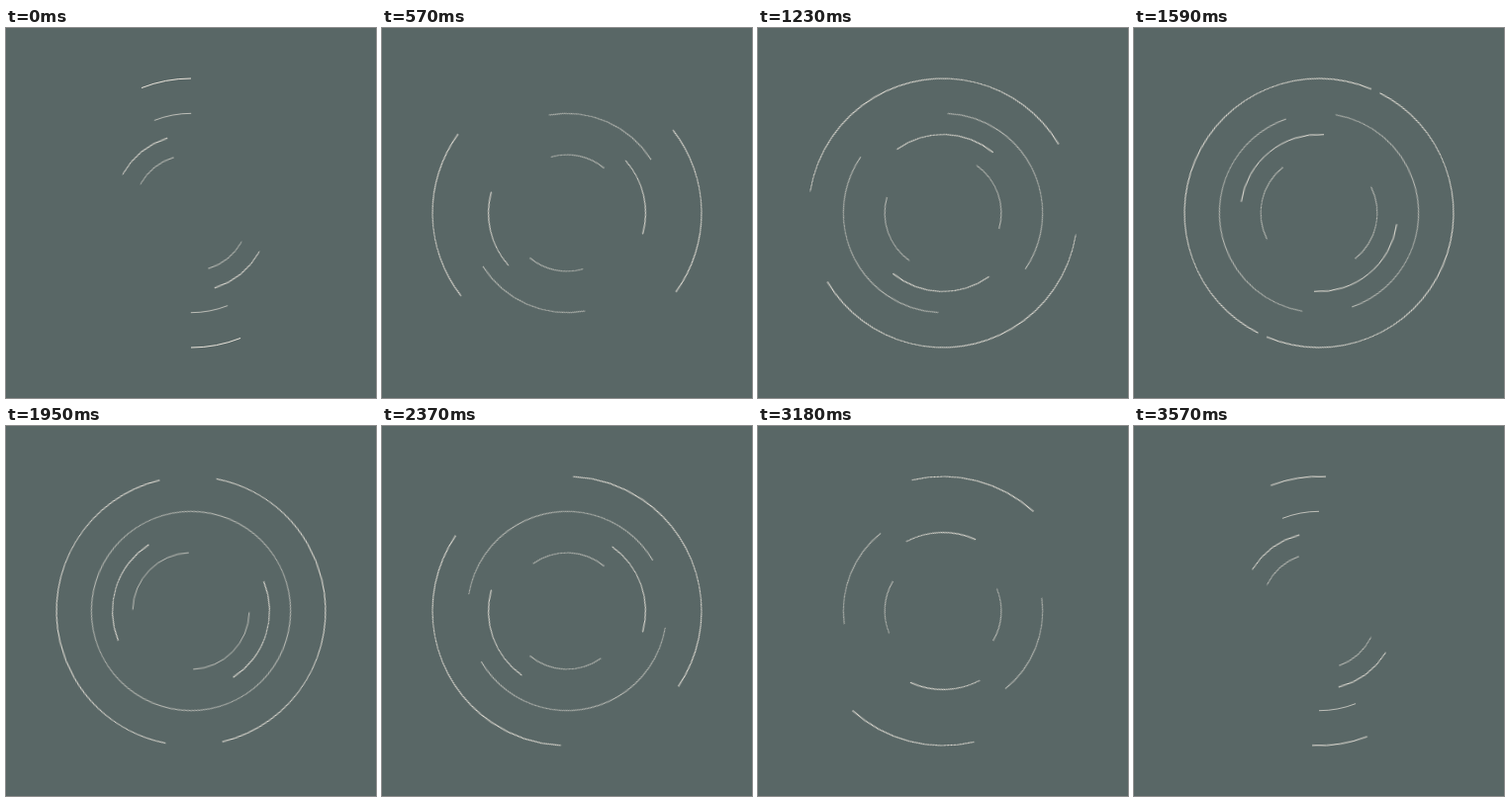
An HTML page that plays this animation: 374 by 374 pixels, repeating every 3.6 s.

```html
<!DOCTYPE html>
<html lang="en">
<head>
<meta charset="utf-8">
<title>Orbiting arcs</title>
<style>
  html, body {
    margin: 0;
    width: 100%;
    height: 100%;
    overflow: hidden;
    background: #596766;
  }
  svg {
    display: block;
    width: 100vw;
    height: 100vh;
  }
  /* Dashes run counterclockwise from the leading end, in degrees. */
  circle {
    fill: none;
    stroke: #e9e4db;
    animation: 3600ms linear infinite;
  }
  .outer { animation-name: turn-outer, grow-outer; }
  .inner { animation-name: turn-inner, grow-inner; }
  .back { animation-direction: reverse; }
  .bold { stroke-width: 1; }
  .fine { stroke-width: .7; }

  @keyframes turn-outer {
    0%, 1% { transform: rotate(-90deg) scaleY(-1); }
    100% { transform: rotate(-450deg) scaleY(-1); }
  }
  @keyframes turn-inner {
    0% { transform: rotate(-107.3deg) scaleY(-1); }
    100% { transform: rotate(-467.3deg) scaleY(-1); }
  }
  @keyframes grow-outer {
    0%, 1.3%, 100% { stroke-dasharray: 21.6 158.4; }
    45.3%, 45.9% { stroke-dasharray: 180 0; }
  }
  @keyframes grow-inner {
    0%, 1.3%, 100% { stroke-dasharray: 43.2 136.8; }
    45.3%, 45.9% { stroke-dasharray: 86.4 93.6; }
  }
</style>
</head>
<body>
<svg viewBox="-187 -187 374 374">
  <circle class="outer bold" r="136" pathLength="360"/>
  <circle class="outer fine back" r="100.7" pathLength="360"/>
  <circle class="inner bold" r="79.4" pathLength="360"/>
  <circle class="inner fine back" r="58.9" pathLength="360"/>
</svg>
</body>
</html>
```
